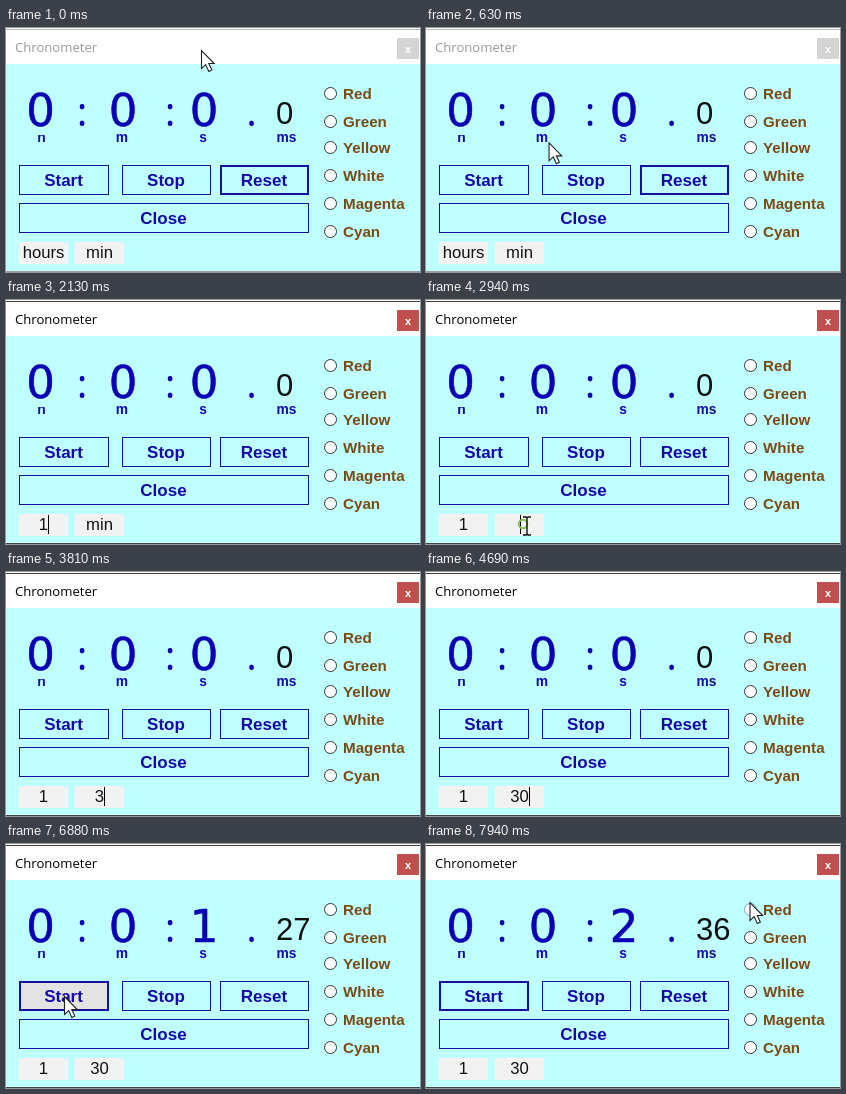
These frames come from a looping animation (414 by 244 pixels, 8 s). An HTML page:

```html
<!DOCTYPE html>
<html lang="en">
<head>
<meta charset="utf-8">
<title>Chronometer</title>
<style>
html, body { margin: 0; width: 100%; height: 100%; overflow: hidden; background: #bff; }
svg { display: block; width: 414px; height: 244px; }
text { font-family: "Liberation Sans", Arial, sans-serif; }
.title { font: 13.1px "Open Sans", sans-serif; }
.big { font: 45px "DejaVu Sans", Verdana, sans-serif; fill: #0c00b6; stroke: #0c00b6; stroke-width: .6; }
.sep { font: 40px "Open Sans", sans-serif; fill: #0c00b6; }
.unit { font-size: 13.8px; font-weight: bold; fill: #1408a8; }
.btn { font-size: 17px; font-weight: bold; fill: #1408a8; }
.opt { font-size: 15.2px; font-weight: bold; fill: #7a4a14; }
.field { font-size: 16.7px; fill: #111; }
.mid { text-anchor: middle; }
</style>
</head>
<body>
<svg id="stage" viewBox="0 0 414 244"></svg>
<script>
const LOOP = 8000, STEP = 62.5;
const NAVY = '#14109c', FORM = '#bfffff';
const CLICKS = [
  { t: 1250, x: 35, y: 226 },
  { t: 2870, x: 97, y: 224 },
  { t: 5600, x: 58, y: 153 }
];
const [HOURS, MINUTES, START] = CLICKS.map(c => c.t);
const TYPE_1 = 1900, TYPE_3 = 3750, TYPE_0 = 4310, SHOW = 4750;
// pointer path: time, x, y
const PATH = [
  [0, 195, 22], [180, 195, 22], [1130, 35, 226], [2380, 35, 226],
  [2750, 97, 226], [4750, 97, 226], [5440, 58, 152], [6950, 58, 152], [7900, 323.5, 58]
];

const stage = document.getElementById('stage');
function add(tag, attrs, parent = stage) {
  const el = document.createElementNS('http://www.w3.org/2000/svg', tag);
  set(el, attrs);
  parent.appendChild(el);
  return el;
}
function set(el, attrs) {
  for (const k in attrs) el.setAttribute(k, attrs[k]);
}
function label(str, x, y, cls, attrs = {}) {
  const el = add('text', { x, y, class: cls, ...attrs });
  el.textContent = str;
  return el;
}
const rect = (x, y, width, height, fill) => add('rect', { x, y, width, height, fill });
const show = (el, on) => el.setAttribute('visibility', on ? 'visible' : 'hidden');

// window
rect(0, 0, 414, 244, FORM);
rect(0, 0, 414, 36, '#fff');
const topEdge = rect(0, 1, 414, 1, '#bbb');
const bottomEdge = rect(0, 243, 414, 1, '#999');
const title = label('Chronometer', 9, 24, 'title');
const closeBox = rect(391, 10, 22, 21, '#ccc');
label('x', 402, 24.5, 'mid', { fill: '#fff', 'font-size': 11, 'font-weight': 'bold' });

// clock
const [, , secs] = [34.5, 117, 198].map(x => label('0', x, 98, 'big mid'));
label(':', 76, 98, 'sep mid');
label(':', 164, 98, 'sep mid');
label('.', 245.5, 98, 'sep mid');
const hundredths = label('0', 270, 95.5, '', { 'font-size': 31, fill: '#111' });
const cut = add('clipPath', { id: 'cut' });
add('rect', { x: 20, y: 107, width: 30, height: 12 }, cut);
label('h', 35.5, 114, 'unit mid', { 'clip-path': 'url(#cut)' });
label('m', 116, 114, 'unit mid');
label('s', 197, 114, 'unit mid');
label('ms', 280.5, 114, 'unit mid');

// buttons
const buttons = [
  ['Start', 13, 137, 90], ['Stop', 116, 137, 89], ['Reset', 214, 137, 89], ['Close', 13, 175, 290]
].map(([name, x, y, w]) => {
  const box = add('rect', { stroke: NAVY });
  label(name, x + w / 2 - .5, y + 21, 'btn mid');
  return { name, x, y, w, h: 30, box };
});

// colour choices
const radios = [['Red', 66], ['Green', 94], ['Yellow', 120], ['White', 148], ['Magenta', 176], ['Cyan', 204]]
  .map(([name, y]) => {
    label(name, 337, y + 5, 'opt');
    return { y, dot: add('circle', { cx: 324.5, cy: y - .5, r: 6, fill: '#fff' }) };
  });

// entry fields
const [hours, mins] = [13, 69].map(x => {
  rect(x, 214, 49, 22, '#f2f2f2');
  return label('', x + 24.5, 230, 'field mid');
});
const caret = rect(0, 215, 1, 19, '#000');

// pointers and click ring
const ring = add('circle', { fill: 'none', stroke: '#8cc152', 'stroke-width': 2 });
const beam = add('path', {
  d: 'M-4 -9H-1L0 -8L1 -9H4M0 -8V8M-4 9H-1L0 8L1 9H4',
  fill: 'none', stroke: '#111', 'stroke-width': 1.4
});
const arrow = add('path', {
  d: 'M.5 .5V18.5L4.7 14.6L7.8 21.4L10.8 20L7.8 13.5H13.2Z',
  fill: '#fff', stroke: '#222', 'stroke-width': 1.1
});

function pointer(t) {
  const i = PATH.findIndex(p => p[0] > t);
  if (i < 0) return PATH[PATH.length - 1].slice(1);
  const [t0, x0, y0] = PATH[i - 1], [t1, x1, y1] = PATH[i];
  const u = (t - t0) / (t1 - t0), e = u * u * (3 - 2 * u);
  return [x0 + (x1 - x0) * e, y0 + (y1 - y0) * e];
}

function drawWindow(active) {
  set(topEdge, { fill: active ? '#444' : '#bbb' });
  set(bottomEdge, { fill: active ? '#444' : '#999' });
  set(title, { fill: active ? '#000' : '#999' });
  set(closeBox, { fill: active ? '#c0504d' : '#d4d4d4' });
}

function drawCaret(t) {
  let x = 38, since = HOURS;
  if (t >= TYPE_0) [x, since] = [103, TYPE_0];
  else if (t >= TYPE_3) [x, since] = [98, TYPE_3];
  else if (t >= MINUTES) [x, since] = [94, MINUTES];
  else if (t >= TYPE_1) [x, since] = [42, TYPE_1];
  set(caret, { x });
  show(caret, t >= HOURS && t < START && (t - since) % 1060 < 530);
}

function render(now) {
  const frame = Math.floor((now % LOOP + 3) / STEP), t = frame * STEP;
  const [x, y] = pointer(t);
  const focus = t < HOURS ? 'Reset' : t >= START ? 'Start' : '';
  drawWindow(t >= HOURS);

  const count = t < START ? 0 : Math.max(0, Math.floor(18.3 + (frame - 93) * 109 / 17));
  secs.textContent = Math.floor(count / 100);
  hundredths.textContent = count % 100;
  hours.textContent = t < HOURS ? 'hours' : t < TYPE_1 ? '' : '1';
  mins.textContent = t < MINUTES ? 'min' : t < TYPE_3 ? '' : t < TYPE_0 ? '3' : '30';

  for (const b of buttons) {
    const over = x >= b.x && x < b.x + b.w && y >= b.y && y < b.y + b.h;
    const line = b.name === focus ? 2 : 1;
    set(b.box, {
      x: b.x + line / 2, y: b.y + line / 2, width: b.w - line, height: b.h - line,
      'stroke-width': line, fill: over ? '#e3e3e3' : FORM
    });
  }
  for (const r of radios) {
    const over = x > 317 && Math.abs(y - r.y) < 10;
    set(r.dot, { stroke: over ? '#7aa5c8' : '#333' });
  }

  drawCaret(t);
  const typing = t >= TYPE_1 && t < 2380 || t >= TYPE_3 && t < SHOW;
  const inField = y >= 214 && y < 236 && (x >= 13 && x < 62 || x >= 69 && x < 118);
  show(beam, inField && !typing);
  show(arrow, !inField && !typing);
  set(beam, { transform: `translate(${x + 4} 226)` });
  set(arrow, { transform: `translate(${x} ${y})` });

  const hit = CLICKS.find(c => t >= c.t && t < c.t + 260);
  show(ring, hit);
  if (hit) set(ring, { cx: hit.x, cy: hit.y, r: 2 + (t - hit.t) * .034 });
}

const origin = performance.now();
function tick() {
  render(performance.now() - origin);
  requestAnimationFrame(tick);
}
tick();
</script>
</body>
</html>
```
